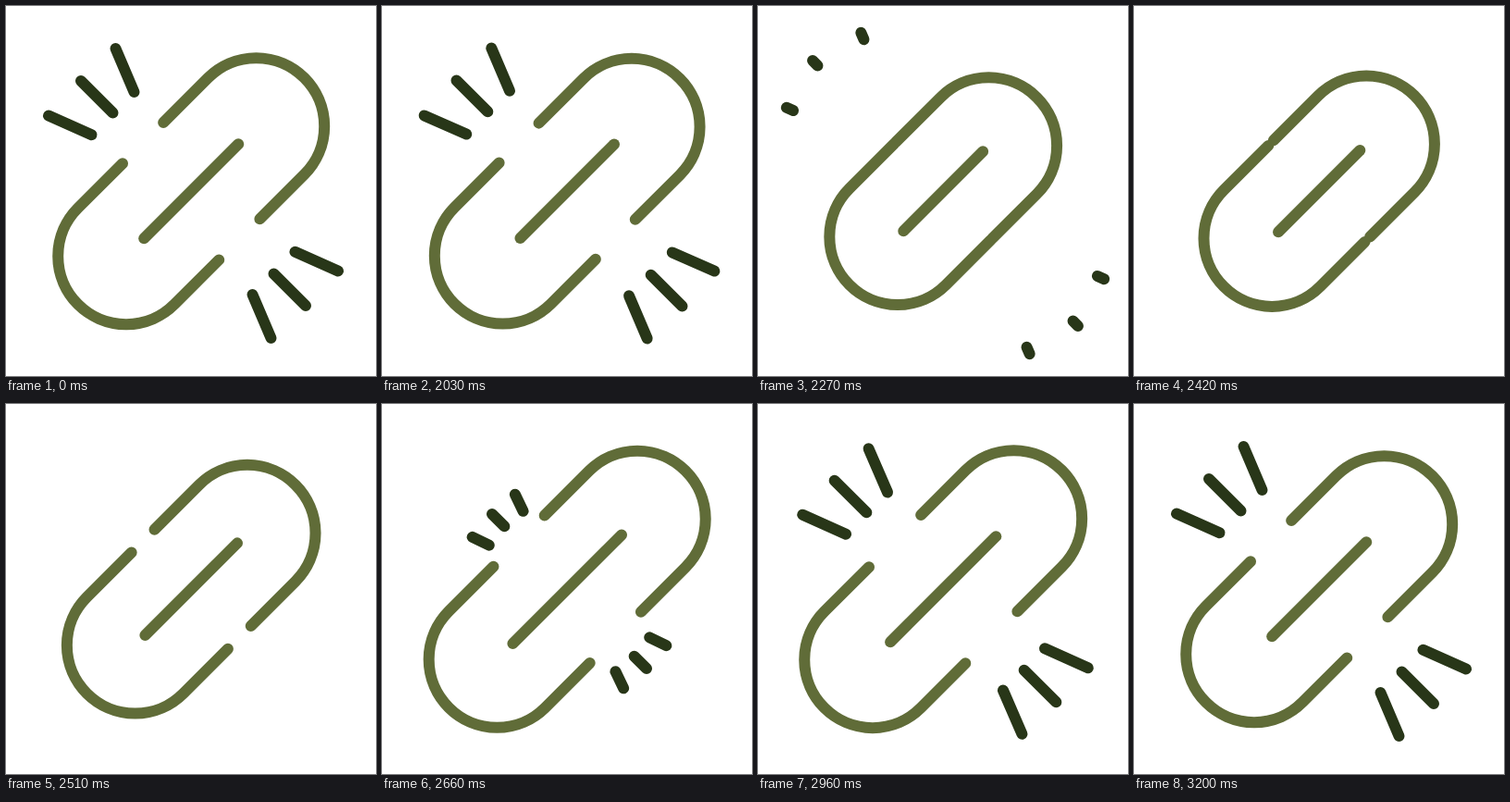
Animation, 400 px wide and 400 px high, one loop 3230 ms. Source, as an HTML page with a canvas:

```html
<!DOCTYPE html>
<html lang="en">
<head>
<meta charset="utf-8">
<title>Link</title>
<style>
  html, body { margin: 0; width: 100%; height: 100%; overflow: hidden; background: #fff; }
  canvas { display: block; width: 400px; height: 400px; }
</style>
</head>
<body>
<canvas id="stage" width="400" height="400"></canvas>
<script>
const ctx = document.getElementById('stage').getContext('2d');

const LOOP = 3230, HOLD = 2030, STEP = 30;
const LINK_COLOR = '#606c38', RAY_COLOR = '#283618';

// Link geometry along its long axis, measured from the link centre.
const CENTER = 200.2, RADIUS = 73.7, ARC_X = 99.4, END_X = 31.2;

// Points of each ray: where it emerges, its resting tips, where it leaves.
const RAYS = [
  { emerge: [153.3, 117], inner: [138.5, 93], outer: [118.5, 46], exit: [110, 25.7] },
  { emerge: [133.2, 133.2], inner: [115.5, 115.5], outer: [81, 81], exit: [55, 55] },
  { emerge: [117, 153.3], inner: [92.5, 139.2], outer: [46, 118.6], exit: [28, 108.2] }
];
const RAY_MIRROR = 405;

const mix = (a, b, p) => a + (b - a) * p;
const mixPoint = (a, b, p) => [mix(a[0], b[0], p), mix(a[1], b[1], p)];

function ease(step, from, to) {
  const x = Math.min(1, Math.max(0, (step - from) / (to - from)));
  return x * x * (3 - 2 * x);
}

// Rest -> closed -> stretched -> rest.
function pose(step, rest, closed, stretched, returnStart) {
  if (step < 12) return mix(rest, closed, ease(step, 0, 10));
  if (step < 23) return mix(closed, stretched, ease(step, 12, 23));
  return mix(stretched, rest, ease(step, returnStart, 40));
}

function setStroke(color) {
  ctx.strokeStyle = color;
  ctx.lineWidth = 12;
  ctx.lineCap = 'round';
  ctx.lineJoin = 'round';
}

function drawLink(step) {
  const shift = pose(step, 0, -21.7, 6.2, 31) * Math.SQRT2;
  const half = pose(step, 51, 42.7, 59.2, 28) * Math.SQRT2;
  setStroke(LINK_COLOR);
  ctx.save();
  ctx.translate(CENTER, CENTER);
  ctx.rotate(-Math.PI / 4);
  for (let side = 0; side < 2; side++) {
    ctx.beginPath();
    ctx.moveTo(END_X + shift, -RADIUS);
    ctx.arc(ARC_X + shift, 0, RADIUS, -Math.PI / 2, Math.PI / 2);
    ctx.lineTo(END_X + shift, RADIUS);
    ctx.stroke();
    ctx.rotate(Math.PI);
  }
  ctx.beginPath();
  ctx.moveTo(-half, 0);
  ctx.lineTo(half, 0);
  ctx.stroke();
  ctx.restore();
}

function rayTips(ray, step) {
  if (step < 12) {
    const p = ease(step, 0, 12);
    return [mixPoint(ray.inner, ray.exit, p), mixPoint(ray.outer, ray.exit, p)];
  }
  return [
    mixPoint(ray.emerge, ray.inner, ease(step, 20, 35)),
    mixPoint(ray.emerge, ray.outer, Math.pow(ease(step, 17, 34), 0.83))
  ];
}

function drawRays(step) {
  if (step >= 12 && step <= 17) return;
  setStroke(RAY_COLOR);
  for (const ray of RAYS) {
    const [a, b] = rayTips(ray, step);
    ctx.beginPath();
    ctx.moveTo(a[0], a[1]);
    ctx.lineTo(b[0], b[1]);
    ctx.moveTo(RAY_MIRROR - a[0], RAY_MIRROR - a[1]);
    ctx.lineTo(RAY_MIRROR - b[0], RAY_MIRROR - b[1]);
    ctx.stroke();
  }
}

let start;
function frame(now) {
  start ??= now;
  const t = (now - start) % LOOP;
  const step = t < HOLD ? 0 : Math.floor((t - HOLD) / STEP) + 1;
  ctx.fillStyle = '#fff';
  ctx.fillRect(0, 0, 400, 400);
  drawLink(step);
  drawRays(step);
  requestAnimationFrame(frame);
}
requestAnimationFrame(frame);
</script>
</body>
</html>
```
